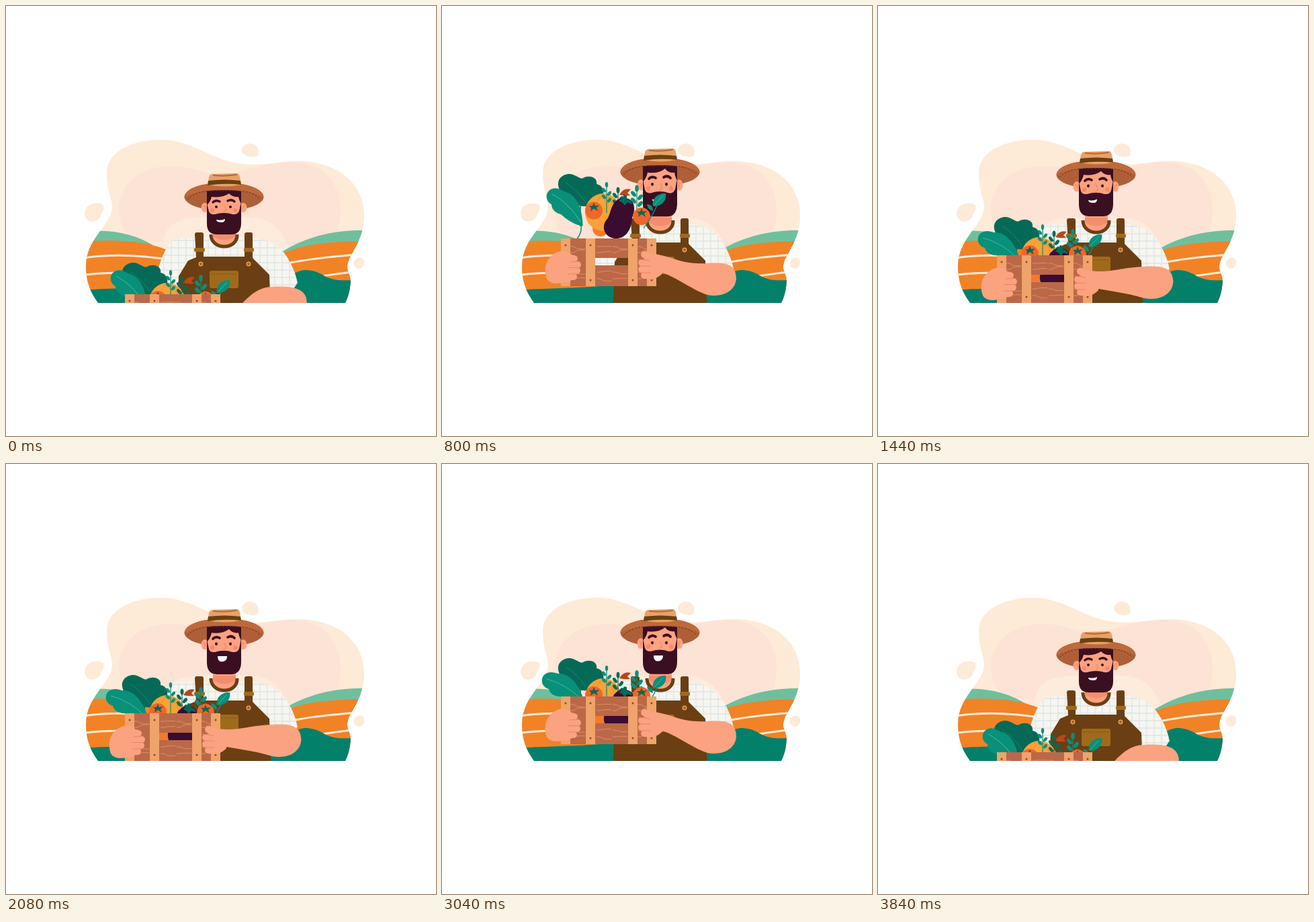
Recreate the animation shown at these times as an HTML page. Size 640 by 640 pixels, loop 4000 ms.

```html
<!DOCTYPE html>
<html lang="en">
<head>
<meta charset="utf-8">
<title>Farmer with a crate</title>
<style>
  html, body { margin: 0; width: 100%; height: 100%; overflow: hidden; background: #fff; }
  svg { display: block; width: 100vw; height: 100vh; }
  .skin { fill: #fba280; }
  .crease { fill: none; stroke: #e88563; stroke-width: 1.1; stroke-linecap: round; }
  .dark { fill: #3b0f22; }
  .denim { fill: #6b3f13; }
  .brass { fill: #a06a1c; }
  .furrow { fill: none; stroke: #fdebd7; stroke-width: 3; }
  .finger { stroke: #fba280; stroke-width: 10; stroke-linecap: round; }
  .grain { fill: none; stroke: #dc8f66; }
  .nail { fill: #8b4b2c; }
</style>
</head>
<body>
<svg viewBox="0 0 640 640" xmlns="http://www.w3.org/2000/svg">
  <defs>
    <clipPath id="ground"><rect width="640" height="442"/></clipPath>
    <path id="blob" d="M150 247C151 216 190 199 230 199C276 199 302 227 345 234C384 240 402 230 440 231C500 234 533 268 533 312C533 352 509 369 508 388C508 395 513 401 513 409C512 425 509 434 505 442H137C124 424 119 408 119 388C119 366 129 350 140 335C156 314 161 304 156 286C152 272 150 262 150 247Z"/>
    <clipPath id="inside"><use href="#blob"/></clipPath>
    <pattern id="plaid" width="11" height="11" patternUnits="userSpaceOnUse">
      <rect width="11" height="11" fill="#f7f5f0"/>
      <path d="M4 0V11M0 8H11" stroke="#dbe6e5" stroke-width="1.3"/>
    </pattern>
  </defs>

  <g clip-path="url(#ground)">
    <use href="#blob" fill="#fdead7"/>
    <g fill="#fdead7">
      <path d="M118 304C121 294 134 292 143 295C149 299 143 306 141 312C138 320 129 323 122 319C117 315 116 309 118 304Z"/>
      <path d="M352 211C356 204 365 203 371 207C376 211 377 220 374 223C369 226 361 225 356 222C351 219 350 215 352 211Z"/>
      <path d="M518 381C520 375 527 373 531 376C535 380 533 387 529 390C524 393 516 388 518 381Z"/>
    </g>

    <g clip-path="url(#inside)">
      <path fill="#fde3d5" d="M190 350C172 332 168 318 168 300C170 262 202 238 245 238C278 238 296 251 318 251C350 250 380 232 428 232C480 235 498 270 498 306C498 330 488 345 480 360Z"/>
      <path fill="#fdebdb" d="M234 368C230 326 252 314 300 315H350C395 311 414 335 424 368Z"/>
      <path fill="#70bf9c" d="M115 336C155 331 192 339 222 358V380H115ZM406 369C440 346 485 332 540 334V375H406Z"/>
      <path fill="#f28226" d="M110 351C165 347 206 349 240 363L262 430H110ZM400 373C440 354 480 350 540 350V430H400Z"/>
      <path class="furrow" d="M115 375Q176 366 245 378M112 401Q160 393 235 402M400 387Q455 374 540 369M425 410Q475 400 540 393"/>
      <path fill="#03806a" d="M110 423C150 420 190 421 262 415V450H110ZM380 424C410 420 424 393 446 393C476 394 470 411 513 408H540V450H380Z"/>
    </g>

    <g id="body">
      <path fill="url(#plaid)" d="M305 344C283 346 262 345 250 347C236 358 229 382 225 398V430H400V444H412L434 412C430 394 422 376 410 363C396 348 378 345 345 344Z"/>
      <path class="skin" d="M308 322H342V345Q338 357 325 357Q312 357 308 345Z"/>
      <path fill="#ee8062" opacity=".6" d="M308 336H342V343Q325 354 308 343Z"/>
      <path fill="none" stroke="#6b3f13" stroke-width="5" d="M305 340C305 364 345 364 344 340"/>
      <path class="denim" d="M281 340Q281 337 284 337H291Q294 337 294 340V373H355V340Q355 337 358 337H365Q367 337 367 340V375L392 400L395 480H254L257 402L271 379L283 374Z"/>
      <g class="brass">
        <rect x="280" y="360" width="16" height="6" rx="2"/>
        <rect x="354" y="360" width="15" height="6" rx="2"/>
        <rect x="303" y="394" width="43" height="26" rx="3"/>
        <g stroke="#f0a35c" stroke-width="1.3"><circle cx="290" cy="384" r="2.8"/><circle cx="361" cy="384" r="2.8"/></g>
      </g>
      <path stroke="#6b3f13" stroke-dasharray="2 2" stroke-width=".8" d="M305 399H344"/>
    </g>

    <ellipse id="brim" cx="324.5" cy="284" rx="59" ry="21" fill="#ae5f37"/>
    <g id="face">
      <g class="skin">
        <ellipse cx="296" cy="300" rx="5.5" ry="7"/><ellipse cx="353" cy="300" rx="5.5" ry="7"/>
        <path d="M299 270H350V325H299Z"/>
      </g>
      <path class="crease" d="M294 297Q298 299 296 303M355 297Q351 299 353 303M325 298Q330 305 324 306"/>
      <g fill="#f8866b"><circle cx="307" cy="304" r="3"/><circle cx="341" cy="304" r="3"/></g>
      <path class="dark" d="M299 270H350V294Q347 290 346 284Q337 285 332 279Q322 286 306 284Q304 292 299 296Z"/>
      <path class="dark" d="M299 293L302 306Q304 311 311 310Q325 306 337 310Q345 311 347 305L350 292V323Q350 340 335 340H314Q299 340 299 324Z"/>
      <path fill="none" stroke="#3b0f22" stroke-width="3.5" stroke-linecap="round" d="M308 292Q312 288 318 291M330 290Q336 287 340 291"/>
      <g class="dark"><circle cx="313" cy="299" r="2"/><circle cx="334" cy="299" r="2"/></g>
      <path id="mouth" fill="#fff"/>
    </g>
    <g id="hat">
      <path fill="#bd693b" d="M265.5 285C267 269 296 263 324 263C353 263 382 269 383.5 285C372 277 348 274 324 274C300 274 277 277 265.5 285Z"/>
      <path fill="none" stroke="#6f3517" stroke-dasharray="3 2" d="M270 288C284 274 302 275 324 275C348 275 366 274 379 288"/>
      <path fill="#e7a268" d="M300 266L302 255Q303 250 308 250L343 249Q347 249 348 254L350 266Q325 271 300 266Z"/>
      <path fill="none" stroke="#b9653d" stroke-width="2" stroke-linecap="round" d="M309 252Q326 254 343 251"/>
      <path fill="#6b4010" d="M301 260Q325 257 349 260L350 266Q325 263 300 267Z"/>
    </g>

    <g id="produce"></g>
    <g id="crate"><path fill="#bb6848" fill-rule="evenodd" d="M178 0H319V71H178ZM228 29H278V40H228Z"/></g>
    <path id="arm" class="skin"/>
    <g id="hands">
      <path class="skin" d="M192 -15C180 -24 168 -18 160 -9C153 -2 152 12 156 22C162 32 178 29 192 25Z"/>
      <path class="finger" d="M184 -11L197 -8M182 0L202 1M182 10H201M182 19H196"/>
      <path class="crease" d="M190 -3L204 -4M188 5.5H205M188 15H202"/>
      <path class="skin" d="M303 -19C312 -16 320 -11 328 -8V14C319 24 308 24 300 21Z"/>
      <path class="finger" d="M301 -14L313 -6M297 -2H314M297 8H314M301 17H314"/>
      <path class="crease" d="M292 -7L309 -5M293 3H310M294 13H310"/>
    </g>
  </g>
</svg>

<script>
const LOOP = 4000, STEP = 80, FLOOR = 429, RAISE = 58;
const DEEP = '#046a57', MID = '#08907a', VEIN = '#4fb49c';

const $ = id => document.getElementById(id);
const move = (el, y, extra = '') => el.setAttribute('transform', `translate(0 ${y}) ${extra}`);

function addGroup(parent, markup) {
  const el = document.createElementNS('http://www.w3.org/2000/svg', 'g');
  el.innerHTML = markup;
  parent.append(el);
  return el;
}

// Smooth step from 0 to 1, and a smooth hump that returns to 0.
const progress = (t, start, end) => Math.min(1, Math.max(0, (t - start) / (end - start)));
const ease = (t, start, end) => { const u = progress(t, start, end); return u * u * (3 - 2 * u); };
const bump = (t, start, end) => Math.sin(Math.PI * progress(t, start, end)) ** 2;

const post = x => `<rect x="${x}" width="14" height="71" fill="#f0a36a"/>
  <circle class="nail" cx="${x + 7}" cy="10" r="1.5"/><circle class="nail" cx="${x + 7}" cy="62" r="1.5"/>`;

function grain() {
  let lines = '';
  for (const y of [12, 21, 50, 60])
    for (const x of [191, 230, 254, 291]) {
      const bend = 4 * Math.sin(x + y);
      lines += `M${x} ${y}h5q5 ${bend} 9 ${bend}h8`;
    }
  return `<path class="grain" d="${lines}"/>`;
}

addGroup($('crate'), grain() + [177, 214, 277, 305].map(post).join(''));

const tomato = (x, y) => `
  <circle cx="${x}" cy="${y}" r="13" fill="#f2652a"/>
  <path d="M${x - 7} ${y - 7}l5 0 2 -5 2 5 6 -1 -4 4 2 5 -6 -4 -5 4 1 -5Z" fill="${DEEP}"/>`;

function sprig(x, y, height, size, color) {
  let art = `<path d="M${x} ${y}v${height}" stroke="${color}" stroke-width="1.2"/>`;
  const leaf = (cx, cy, angle) => `<ellipse cx="${cx}" cy="${cy}" rx="${size * .55}" ry="${size}" fill="${color}" transform="rotate(${angle} ${cx} ${cy})"/>`;
  for (let i = 0; i < 4; i++) {
    const side = i % 2 ? 1 : -1;
    art += leaf(x + side * size, y + 8 + i * 5, side * 40);
  }
  return art + leaf(x, y, 0);
}

// Drawn as they rest in the raised crate; `high` is the height of the toss.
const items = [
  { high: 39, art: `
    <path d="M208 350Q204 372 206 392" fill="none" stroke="${DEEP}" stroke-width="1.5"/>
    <path d="M173 331C171 318 186 311 195 315C203 318 206 322 210 320C219 315 232 319 230 329C242 331 243 346 236 352C229 361 214 364 204 361C194 358 194 350 187 347C179 344 174 339 173 331Z" fill="${DEEP}"/>
    <path d="M184 327Q202 338 214 357" fill="none" stroke="#23806b"/>` },
  { high: 29, tilt: 14, art: `
    <path d="M208 376Q214 388 208 402" fill="none" stroke="${MID}" stroke-width="1.5"/>
    <path d="M212 380C198 382 184 375 176 371C164 371 160 364 159 360C148 357 146 345 152 339C160 332 168 336 173 337C188 336 204 350 212 380Z" fill="${MID}"/>
    <path d="M156 345Q184 352 207 375" fill="none" stroke="${VEIN}"/>` },
  { high: 49, art: '<circle cx="236" cy="405" r="12" fill="#f47a2b"/>' },
  { high: 40, art: `
    <ellipse cx="240" cy="372" rx="27" ry="28" fill="#f9a238"/>
    <path d="M238 346q-12 12 -10 36M244 346q14 10 13 34" fill="none" stroke="#f28a2a"/>` },
  { high: 38, art: sprig(245, 329, 42, 4, MID) },
  { high: 40, art: sprig(262, 339, 38, 4.5, DEEP) },
  { high: 38, art: '<path d="M264 344Q270 333 281 336L276 341L280 345Q272 346 264 344Z" fill="#b8481d"/>' },
  { high: 50, art: `
    <path d="M268 361C285 359 290 374 283 390C282 412 270 422 258 421C242 420 236 404 245 393C252 386 250 364 268 361Z" fill="#3a0c30"/>
    <path d="M263 365q6 -4 8 -9l4 1 0 5q8 2 8 8l-7 -3 -4 5 -4 -5Z" fill="${DEEP}"/>` },
  { high: 44, start: 220, art: sprig(290, 337, 40, 5, MID) },
  { high: 43, start: 220, art: tomato(226, 369) },
  { high: 32, art: tomato(297, 370) },
  { high: 36, art: `
    <path d="M322 352Q318 366 300 392" fill="none" stroke="${MID}" stroke-width="1.3"/>
    <path d="M314 359C312 347 322 339 333 340C335 350 327 360 314 359ZM314 366q-8 -2 -9 -10q9 0 9 10Z" fill="${MID}"/>
    <path d="M316 357L329 343" stroke="${VEIN}"/>` }
];
for (const item of items) item.el = addGroup($('produce'), item.art);

// Grows from a small smirk into an open smile.
function mouthPath(open) {
  const top = 318 - 2.5 * open, bottom = 322 + open;
  const left = 313 + 2 * open, right = 326 + 3 * open;
  return `M${left} ${top}Q320 ${320 - 4.5 * open} ${right} ${top - 1 + open}
    Q${right} ${bottom} 321 ${bottom}Q${left} ${bottom} ${left} ${top}Z`;
}

function armPath(wrist, elbow) {
  const right = 437 + (elbow - 405) * .28;
  return `M316 ${wrist - 12}C345 ${wrist - 8} 355 ${elbow - 20} 395 ${elbow - 22}
    C425 ${elbow - 24} ${right} ${elbow - 20} ${right + 1} ${elbow}
    C${right} ${elbow + 20} ${right - 20} ${elbow + 29} ${right - 42} ${elbow + 25}
    C370 ${elbow + 17} 345 ${wrist + 18} 316 ${wrist + 13}Z`;
}

function draw(t) {
  const fall = ease(t, 3200, 3680);
  const raised = ease(t, 0, 720) - fall;
  const upright = ease(t, 160, 760) - fall;
  const toss = bump(t, 400, 1200), hop = bump(t, 2640, 3440);
  const top = FLOOR - RAISE * raised - 25 * (toss + hop);
  const wrist = top + 46 - 11 * raised;
  const hat = -33 * upright - 4 * toss;

  move($('body'), -21 * upright);
  move($('brim'), hat);
  move($('hat'), hat);
  const stretch = 1 + .1 * upright + .07 * toss + .04 * hop;
  move($('face'), 291 - 32 * upright - 3 * toss - 2 * hop, `scale(1 ${stretch}) translate(0 -291)`);
  $('mouth').setAttribute('d', mouthPath(ease(t, 1480, 1760) - ease(t, 3200, 3440)));
  move($('crate'), top);
  move($('hands'), wrist + 3);
  $('arm').setAttribute('d', armPath(wrist, 440 - 30 * raised - 5 * (toss + hop)));

  const sink = 10 * (1 - upright), lag = 14 * bump(t, 3200, 3680);
  for (const { el, high, start = 400, tilt = 0 } of items) {
    const y = top - FLOOR + RAISE + sink - lag - high * bump(t, start, 1200);
    move(el, y, `rotate(${tilt * (1 - upright + toss)} 205 371)`);
  }
}

function tick() {
  const t = performance.now() % LOOP;
  draw(Math.floor(t / STEP) * STEP);
  requestAnimationFrame(tick);
}
tick();
</script>
</body>
</html>
```
